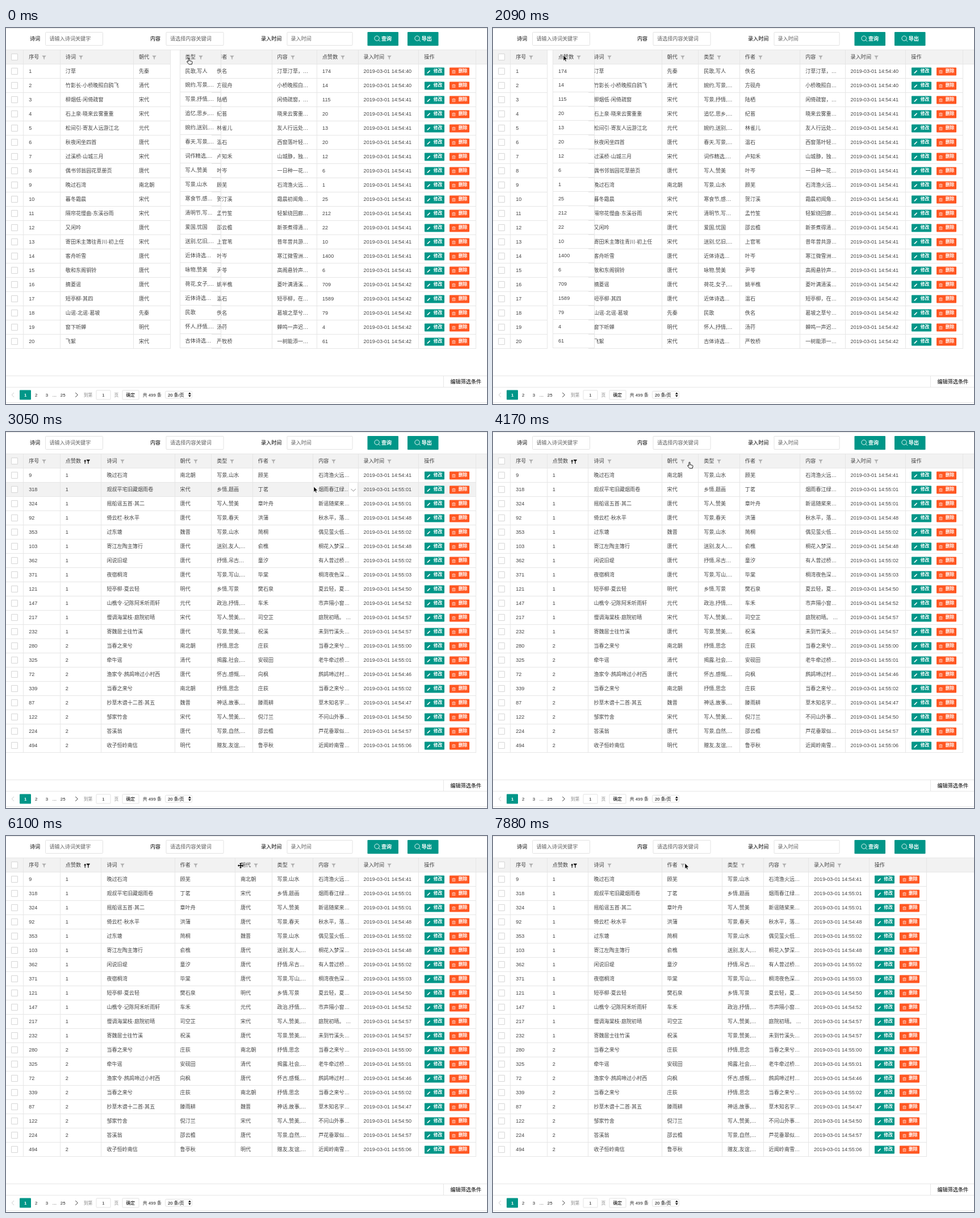
Recreate the animation shown at these times as an HTML page. Size 847 px wide and 661 px high, loop 8000 ms.

```html
<!DOCTYPE html>
<html lang="zh-CN">
<head>
<meta charset="utf-8">
<title>诗词表格</title>
<style>
html,body{margin:0;width:100%;height:100%;overflow:hidden;background:#fff}
body{position:relative;font:9.1px "Liberation Sans","Noto Sans CJK SC","Noto Sans CJK",sans-serif;color:#444}
#ui,#ptr{position:absolute;left:0;top:0;overflow:visible}
.line{fill:#e6e6e6}
.box{fill:#fff;stroke:#e2e2e2}
.dark{fill:#000}
.label{font-weight:500}
.ph{fill:#606060}
.green{fill:#009688}
.btn{fill:#fff;font-weight:700}
.pager{font-size:7.8px;fill:#222}
.spin,.load .data{display:none}
.load .spin{display:block}
.table,.col,#strip,#hover,#more{position:absolute;left:0;top:0}
.col{top:39px}
.h,.c{box-sizing:border-box;height:25px;line-height:24px;padding-left:9px;white-space:nowrap;
  border:solid #e6e6e6;border-width:0 1px 1px 0;position:relative}
.h{background:#f2f2f2}
.h svg{position:absolute;top:8.5px;margin-left:5px;overflow:visible}
.drag{z-index:2}
.drag .h,.drag .c{box-shadow:-1px 0 #e6e6e6}
.drag .c:nth-child(n+3){top:-1px}
.tick{position:absolute;left:9px;top:6px;width:10px;height:10px;border:1px solid #d6d6d6;border-radius:1px;background:#fff;box-sizing:content-box}
.op{position:absolute;top:5px;width:35px;height:14px;line-height:14px;border-radius:1px;color:#fff;font-size:7.8px;font-weight:700;text-indent:16px;transform:translateY(.4px)}
.op svg{position:absolute;left:4.5px;top:3.5px;width:7px;height:7px}
.edit{left:9.5px;background:#009688}
.del{left:53.4px;background:#ff5722}
#strip{top:39px;width:847px;height:24px;background:#f2f2f2;border-bottom:1px solid #e6e6e6}
#hover{width:828px;height:24px;background:#f2f2f2}
#more{left:603px;width:15px;height:24px;background:#fff;border:solid #e6e6e6;border-width:0 1px}
</style>
</head>
<body>
<svg width="0" height="0" style="position:absolute">
  <symbol id="funnel" viewBox="0 0 8 8"><path d="M.3.5H7.7L4.8 4V7.6L3.2 6.5V4Z"/></symbol>
  <symbol id="pen" viewBox="0 0 8 8"><path d="M.6 7.4 1.1 5.5 5.8.9 7.1 2.2 2.5 6.9Z" fill="#fff"/></symbol>
  <symbol id="bin" viewBox="0 0 8 8"><path d="M.6 1.9H7.4M2.8 1.7V.8H5.2V1.7M1.4 2V7.2H6.6V2M3.2 3.4V5.9M4.8 3.4V5.9" fill="none" stroke="#fff" stroke-width=".7"/></symbol>
  <symbol id="lens" viewBox="0 0 12 12"><path d="M8.4 8.2 11 10.8M9.3 5.2A4.2 4.2 0 1 1 .9 5.2 4.2 4.2 0 1 1 9.3 5.2" fill="none" stroke="#fff" stroke-width=".9"/></symbol>
</svg>

<div id="hover"></div>
<div id="strip" class="data"></div>
<div id="tables" class="data"></div>
<div id="more"><svg width="15" height="24"><path d="M3.5 11 7.7 15.2 11.9 11" fill="none" stroke="#888"/></svg></div>

<svg id="ui" width="847" height="661">
  <g class="line">
    <rect width="847" height="1"/><rect y="38" width="847" height="1"/>
    <rect y="631" width="847" height="1"/><rect y="658" width="847" height="1"/>
  </g>
  <g class="box">
    <rect x="69.5" y="7.5" width="101" height="23" rx="1"/>
    <rect x="282" y="7.5" width="101" height="23" rx="1"/>
    <rect x="495" y="7.5" width="115" height="23" rx="1"/>
  </g>
  <g class="dark label">
    <text x="42" y="22.4">诗词</text><text x="254" y="22.4">内容</text><text x="449" y="22.4">录入时间</text>
  </g>
  <g class="ph">
    <text x="76.5" y="22.4">请输入诗词关键字</text><text x="289" y="22.4">请选择内容关键词</text><text x="501.5" y="22.4">录入时间</text>
  </g>
  <g class="green">
    <rect x="636.5" y="7" width="54.5" height="24.3" rx="1"/><rect x="707" y="7" width="54.5" height="24.3" rx="1"/>
  </g>
  <use href="#lens" x="648" y="13" width="12" height="12"/><use href="#lens" x="719" y="13" width="12" height="12"/>
  <g class="btn"><text x="661" y="22.4">查询</text><text x="731.7" y="22.4">导出</text></g>

  <g class="data">
    <g class="line"><rect y="611" width="847" height="1"/><rect x="770" y="612" width="1" height="19"/></g>
    <text class="dark" x="782.5" y="624.6">编辑筛选条件</text>
    <g class="pager">
      <path d="M14 641 10.3 645 14 649" fill="none" stroke="#ccc"/>
      <path d="M122.3 641 126.3 645 122.3 649" fill="none" stroke="#333"/>
      <rect class="green" x="24" y="636.5" width="20" height="17" rx="1"/>
      <text class="btn" x="32" y="647.8">1</text>
      <text x="51" y="647.8">2</text><text x="69.8" y="647.8">3</text>
      <text x="81.5" y="647.8">…</text><text x="95.8" y="647.8">25</text>
      <g class="box">
        <rect x="159" y="637" width="25" height="16" rx="1"/><rect x="205" y="637" width="29" height="16" rx="1"/>
        <rect x="280.5" y="638.5" width="47" height="12.5" rx="2"/>
      </g>
      <g fill="#888"><text x="136.8" y="647.8">到第</text><text x="190.5" y="647.8">页</text></g>
      <text x="169.3" y="647.8">1</text><text class="dark" x="211.5" y="647.8">确定</text>
      <text x="240.8" y="647.8">共 499 条</text>
      <text class="dark label" x="285" y="647.8">20 条/页</text>
      <path class="dark" d="M321 643.8 323.4 640.6 325.8 643.8ZM321 645.6 323.4 648.8 325.8 645.6Z"/>
    </g>
  </g>

  <g class="spin" fill="#b4b4b4">
    <circle cx="423.6" cy="328.6" r="1.4"/><circle cx="418.4" cy="330.8" r="1.3"/><circle cx="416.3" cy="335.6" r="1.1"/>
    <circle cx="418.4" cy="340.9" r="1"/><circle cx="423.6" cy="343" r=".8"/><circle cx="428.8" cy="340.9" r=".6"/>
  </g>
</svg>

<svg id="ptr" width="1" height="1" style="z-index:5">
  <path id="arrow" d="M0 0V9.6L2.2 7.6 3.8 11 5.3 10.3 3.8 7H6.8Z" fill="#000" stroke="#fff" stroke-width=".6"/>
  <path id="hand" d="M-1 1Q-1 0 0 0T1 1V4.6L4.8 5.4Q6.2 5.8 6 7.2L5.2 10.8H.2L-3.2 6.8Q-3.8 5.8-2.8 5.5T-1 6.4Z" fill="#fff" stroke="#000" stroke-width=".9"/>
  <path id="move" d="M0-5 2-3H.7V-.7H3V-2L5 0 3 2V.7H.7V3H2L0 5-2 3H-.7V.7H-3V2L-5 0-3-2V-.7H-.7V-3H-2Z" fill="#000" stroke="#fff" stroke-width=".9" paint-order="stroke"/>
</svg>

<script>
const $ = id => document.getElementById(id);

// number | title | dynasty | kind | author | content | likes | minute:second
const byNumber = `1|汀草|先秦|民歌,写人|佚名|汀草汀草，…|174|54:40
2|竹影长·小桥晚照白鸥飞|清代|婉约,写景,…|方砚舟|小桥晚照白…|14|54:40
3|柳烟低·闲倚疏窗|宋代|写景,抒情,…|陆栖|闲倚疏窗，…|115|54:41
4|石上泉·晓来云雾重重|宋代|追忆,思乡,…|纪苔|晓来云雾重…|20|54:41
5|松间引·寄友人远游江北|元代|婉约,送别,…|林雀儿|友人行远处…|13|54:41
6|秋夜闲坐四首|唐代|春天,写景,…|温石|西窗落叶轻…|20|54:41
7|过溪桥·山城三月|宋代|词作精选,…|卢知禾|山城静，独…|12|54:41
8|偶书邻翁园花草册页|唐代|写人,赞美|叶岑|一日种一花…|6|54:41
9|晚过石湾|南北朝|写景,山水|顾芜|石湾渔火远…|1|54:41
10|暮冬霜晨|宋代|寒食节,感…|贺汀溪|霜晨初闻角…|25|54:41
11|隔帘花慢曲·东溪谷雨|宋代|清明节,写…|孟竹笙|轻絮绕回廊…|212|54:41
12|又闲吟|唐代|爱国,忧国|邵云檐|新茶煮得清…|22|54:41
13|寄田禾主簿往青川·初上任|宋代|送别,忆旧,…|上官苇|昔年曾共游…|10|54:41
14|客舟听雪|唐代|近体诗选…|叶岑|寒江微雪洲…|1400|54:41
15|敬和东阁铜铃|唐代|咏物,赞美|尹苓|高阁悬铃声…|6|54:41
16|摘菱谣|唐代|荷花,女子,…|姚半樵|菱叶满清溪…|709|54:42
17|短亭柳·其四|唐代|近体诗选…|温石|短亭柳，在…|1589|54:42
18|山谣·北谣·葛坡|先秦|民歌|佚名|葛坡之草兮…|79|54:42
19|窗下听蝉|明代|怀人,抒情,…|汤荇|蝉鸣一声迟…|4|54:42
20|飞絮|宋代|古体诗选…|严牧桥|一树能添一…|61|54:42`;

const byLikes = `9|晚过石湾|南北朝|写景,山水|顾芜|石湾渔火远…|1|54:41
318|观叔平宅旧藏烟雨卷|宋代|乡情,题画|丁茗|烟雨春江绿…|1|55:01
324|摇船谣五首·其二|唐代|写人,赞美|章叶舟|新谣随桨来…|1|55:01
92|倚云栏·秋水平|唐代|写景,春天|洪蒲|秋水平，落…|1|54:48
353|过东塘|魏晋|写景,山水|简桐|偶见萤火低…|1|55:02
103|寄江左陶主簿行|唐代|送别,友人,…|俞樵|桐花入梦深…|1|54:48
362|闲说旧堤|唐代|抒情,吊古…|童汐|有人曾过桥…|1|55:02
371|夜宿桐湾|唐代|写景,写山,…|毕棠|桐湾夜色深…|1|55:03
121|短亭柳·夏云轻|明代|乡情,写景|樊石泉|夏云轻，夏…|1|54:50
147|山樵令·记陈阿禾听雨轩|元代|政治,抒情,…|车禾|市声隔小窗…|1|54:52
217|慢调海棠枝·庭院初晴|宋代|写人,赞美,…|司空芷|庭院初晴。 …|1|54:57
232|寄魏居士往竹溪|唐代|写景,赞美,…|祝溪|未到竹溪头…|1|54:57
280|当春之来兮|南北朝|抒情,思念|庄荻|当春之来兮…|2|55:00
325|牵牛谣|清代|揭露,社会,…|安砚田|老牛牵过桥…|2|55:01
72|渔家令·鹧鸪啼过小村西|唐代|怀古,感慨,…|向枫|鹧鸪啼过村…|2|54:46
339|当春之来兮|南北朝|抒情,思念|庄荻|当春之来兮…|2|55:02
87|抄草木谱十二首·其五|魏晋|神话,故事,…|滕雨耕|草木知名字…|2|54:47
122|邹家竹舍|宋代|写人,赞美,…|倪汀兰|不问山外事…|2|54:50
224|答溪翁|唐代|写景,自然,…|邵云檐|芦花垂翠似…|2|54:57
494|收子恒岭南信|明代|赠友,友谊,…|鲁亭秋|近闻岭南雪…|2|55:06`;

const keys = 'nsdkaclto';
const titles = ['序号', '诗词', '朝代', '类型', '作者', '内容', '点赞数', '录入时间', '操作'];
const widths = {n: 64.6, s: 129.2, d: 64.6, k: 72.6, a: 106.4, c: 79.4, l: 72.6, t: 106.7, o: 101};
const first = 31.2;

const icon = (id, style = '') => `<svg width="8" height="8" style="${style}"><use href="#${id}"/></svg>`;
const sortMark = `<svg width="11" height="8" fill="#111"><path d="M0 3.4 2.2.5 4.4 3.4H2.8V7.8H1.6V3.4Z"/>
  <path d="M4.8.5H10.6V1.8L8.5 3.4V7.8H7.2V3.4L4.8 1.8Z"/></svg>`;
const buttons = `<span class="op edit">${icon('pen')}修改</span><span class="op del">${icon('bin')}删除</span>`;
const tick = '<i class="tick"></i>';

function addColumn(parent, width, head, cells) {
  const col = document.createElement('div');
  col.className = 'col';
  col.style.width = width + 'px';
  col.innerHTML = `<div class="h">${head}</div>` + cells.map(c => `<div class="c">${c}</div>`).join('');
  parent.append(col);
  return col;
}

function makeTable(text, sorted) {
  const el = document.createElement('div');
  el.className = 'table';
  $('tables').append(el);
  const rows = text.split('\n').map(r => r.split('|'));
  addColumn(el, first, tick, rows.map(() => tick));
  const cols = {};
  [...keys].forEach((key, i) => {
    let mark = key === 'o' ? '' : icon('funnel', 'fill:#b0b0b0');
    if (sorted && key === 'l') mark = sortMark;
    const cells = rows.map(r => key === 'o' ? buttons : key === 't' ? '2019-03-01 14:' + r[i] : r[i]);
    cols[key] = addColumn(el, widths[key], titles[i] + mark, cells);
  });
  return {el, cols};
}
const tables = [makeTable(byNumber, false), makeTable(byLikes, true)];

// Each run holds n stepped poses from t0 to t1, pointer and dragged column moving evenly.
const poses = [];
function run(t0, t1, n, cur, [x0, y0], [x1, y1] = [x0, y0], drag, d0, d1 = d0) {
  for (let i = 0; i < n; i++) {
    const p = n > 1 ? i / (n - 1) : 0, mix = (a, b) => a + (b - a) * p;
    poses.push({t: mix(t0, t1), cur, x: mix(x0, x1), y: mix(y0, y1), drag, dx: mix(d0, d1)});
  }
}
run(0, 0, 1, 'hand', [322, 52.5], undefined, 'k', 306.6);
run(150, 320, 2, 'hand', [315, 52], [309, 52], 'k', 300, 294);
run(490, 490, 1, 'hand', [306, 52]);
run(660, 1170, 4, 'hand', [370, 53], [562, 51]);
run(1320, 1320, 1, 'move', [545, 51], undefined, 'l', 544);
run(1470, 1470, 1, 'arrow', [283.3, 46], undefined, 'l', 532.8);
run(1680, 2070, 3, 'arrow', [210, 47], [124, 48], 'l', 400, 106);
run(2270, 2270, 1, 'hand', [122, 48]);
run(2600, 2600, 1, 'arrow', [472.3, 79]);
run(2810, 2810, 1, 'arrow', [515, 90]);
run(3050, 3050, 1, 'arrow', [542.3, 96]);
run(3280, 3280, 1, 'arrow', [512, 70]);
run(3520, 3520, 1, 'hand', [474, 55]);
run(3730, 4340, 4, 'hand', [440, 56], [299, 52]);
run(4540, 4740, 2, 'hand', [370, 52], [442, 52]);
run(4970, 4970, 1, 'move', [341.3, 52], undefined, 'a', 337.4);
run(5180, 5340, 2, 'move', [318, 52], [305, 52], 'a', 314, 300);
run(5500, 5950, 4, 'hand', [306, 50], [413, 48]);
run(6100, 6100, 1, 'move', [413.3, 51.8]);
run(6270, 6270, 1, 'hand', [413, 48]);
run(6570, 7110, 4, 'move', [413, 44], [407, 19], 'd', 403, 396.6);
run(7280, 7460, 2, 'move', [407, 17], [407, 16], 'd', 396.6);
run(7670, 7670, 1, 'arrow', [385, 30]);
run(7880, 7880, 1, 'arrow', [338.2, 48]);

const orders = [[0, 'nsdkaclto'], [2270, 'nlsdkacto'], [5500, 'nlsadkcto'], [7670, 'nlsakcto']];
const at = (list, t, time) => list.reduce((best, s) => time(s) <= t ? s : best, list[0]);

function place(order) {
  let x = first;
  const left = {};
  for (const k of order) { left[k] = x; x += widths[k]; }
  return {left, end: x};
}

// A dragged column trades places once it passes the middle of its left neighbour.
function settle(order, drag, dx) {
  for (;;) {
    const i = order.indexOf(drag), prev = order[i - 1], {left} = place(order);
    if (i < 1 || dx > left[prev] + widths[prev] / 2) return order;
    [order[i - 1], order[i]] = [drag, prev];
  }
}

function draw(p) {
  const {t} = p;
  let order = [...at(orders, t, s => s[0])[1]];
  if (p.drag) order = settle(order, p.drag, p.dx);
  const {left, end} = place(order);
  const table = tables[t < 2600 ? 0 : 1];
  tables.forEach(tb => tb.el.style.display = tb === table ? '' : 'none');
  for (const k of keys) {
    const col = table.cols[k], held = k === p.drag;
    col.style.display = k in left ? '' : 'none';
    col.style.left = (held ? p.dx : left[k]) + 'px';
    col.classList.toggle('drag', held);
  }
  $('strip').style.left = Math.round(end) + 'px';

  const loading = t >= 2600 && t < 2810;
  document.body.classList.toggle('load', loading);
  const row = Math.floor((p.y - 63) / 25);
  const over = !loading && !p.drag && row >= 0;
  $('hover').style.display = over ? '' : 'none';
  $('hover').style.top = $('more').style.top = 64 + row * 25 + 'px';
  $('more').style.display = over && p.x > left.c ? '' : 'none';

  for (const c of ['arrow', 'hand', 'move']) $(c).style.display = c === p.cur ? '' : 'none';
  $('ptr').style.left = p.x + 'px';
  $('ptr').style.top = p.y + 'px';
}

let shown;
function tickFrame(now) {
  const pose = at(poses, now % 8000, s => s.t);
  if (pose !== shown) draw(shown = pose);
  requestAnimationFrame(tickFrame);
}
tickFrame(performance.now());
</script>
</body>
</html>
```
